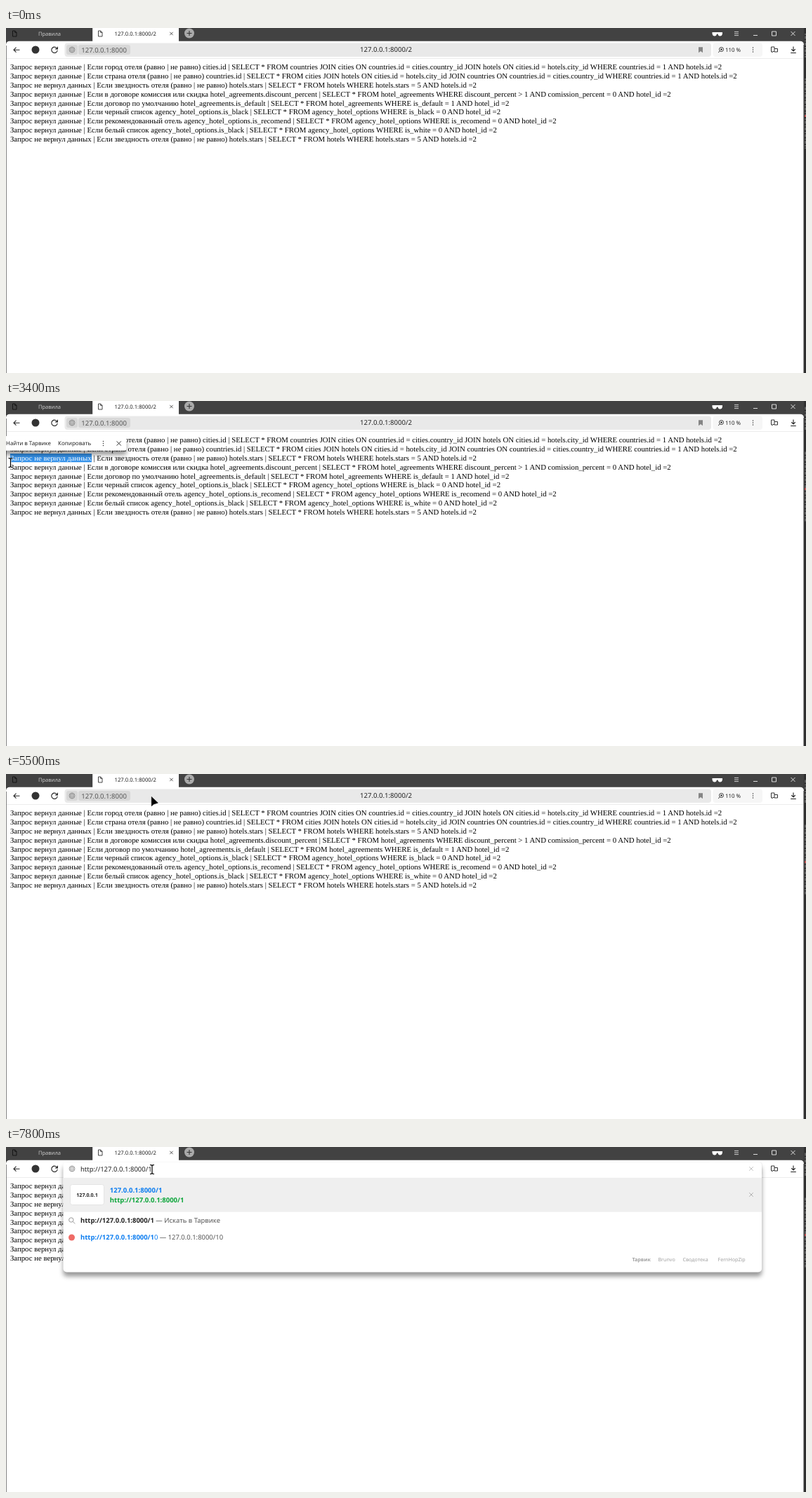
Write an HTML page that moves like this. It is 1139 px wide and 492 px high and loops after 8 s.

```html
<!DOCTYPE html>
<html lang="ru">
<head>
<meta charset="utf-8">
<style>
  html, body { margin: 0; width: 100%; height: 100%; overflow: hidden; background: #fff; }
  svg { display: block; width: 100%; height: 100%; }
  text { font-family: "Noto Sans", "Open Sans", sans-serif; text-rendering: geometricPrecision; }
  .page text { font: 10.77px "Liberation Serif", serif; }
  .medium { stroke-width: .03em; }
  .float { filter: drop-shadow(0 6px 3px rgba(0, 0, 0, .4)); }
</style>
</head>
<body>
<svg id="stage" viewBox="0 0 1139 492"></svg>
<script>
const QUERY = 'Запрос вернул данные | Если ';
const EMPTY = 'Запрос не вернул данных | Если звездность отеля (равно | не равно) hotels.stars | SELECT * FROM hotels WHERE hotels.stars = 5 AND hotels.id =2';
const LINES = [
  QUERY + 'город отеля (равно | не равно) cities.id | SELECT * FROM countries JOIN cities ON countries.id = cities.country_id JOIN hotels ON cities.id = hotels.city_id WHERE countries.id = 1 AND hotels.id =2',
  QUERY + 'страна отеля (равно | не равно) countries.id | SELECT * FROM cities JOIN hotels ON cities.id = hotels.city_id JOIN countries ON countries.id = cities.country_id WHERE countries.id = 1 AND hotels.id =2',
  EMPTY,
  QUERY + 'в договоре комиссия или скидка hotel_agreements.discount_percent | SELECT * FROM hotel_agreements WHERE discount_percent &gt; 1 AND comission_percent = 0 AND hotel_id =2',
  QUERY + 'договор по умолчанию hotel_agreements.is_default | SELECT * FROM hotel_agreements WHERE is_default = 1 AND hotel_id =2',
  QUERY + 'черный список agency_hotel_options.is_black | SELECT * FROM agency_hotel_options WHERE is_black = 0 AND hotel_id =2',
  QUERY + 'рекомендованный отель agency_hotel_options.is_recomend | SELECT * FROM agency_hotel_options WHERE is_recomend = 0 AND hotel_id =2',
  QUERY + 'белый список agency_hotel_options.is_black | SELECT * FROM agency_hotel_options WHERE is_white = 0 AND hotel_id =2',
  EMPTY,
];
const HOST = '127.0.0.1:8000', BLUE = '#3592ea';

// Drawing helpers; text is placed by its vertical centre.
const text = (x, y, str, size, fill = '#222', extra = '') =>
  `<text x="${x}" y="${y + size * .36}" font-size="${size}" fill="${fill}" stroke="${fill}" stroke-width="0" ${extra}>${str}</text>`;
const mid = (x, y, str, size, fill, extra = '') => text(x, y, str, size, fill, 'text-anchor="middle" ' + extra);
const rect = (x, y, w, h, fill, r = 0, extra = '') =>
  `<rect x="${x}" y="${y}" width="${w}" height="${h}" rx="${r}" fill="${fill}" ${extra}/>`;
const disc = (x, y, r, fill, extra = '') => `<circle cx="${x}" cy="${y}" r="${r}" fill="${fill}" ${extra}/>`;
const path = (x, y, d, color = '#333', w = 1) =>
  `<path transform="translate(${x} ${y})" d="${d}" fill="none" stroke="${color}" stroke-width="${w}"/>`;
const cross = (x, y, r, color, w) => path(x, y, `M${-r} ${-r}L${r} ${r}M${r} ${-r}L${-r} ${r}`, color, w);
const dots = (x, y) => [-3, 0, 3].map(d => disc(x, y + d, .75, '#333')).join('');
const bookmark = x => `<path d="M${x - 3} 27.2h6v8l-3-2.3l-3 2.3z" fill="#858585"/>`;
const bold = 'font-weight="700"', medium = 'class="medium"';

const file = (x, color) => path(x, 8, 'M-2.5-4H.7L3-1.6V4H-2.5zM.7-4V-1.6H3', color, .9);
const globe = () => disc(94, 31, 4, 'none', 'stroke="#777" stroke-width=".7"') +
  path(94, 31, 'M-3.7-1.2H3.7M-3.7 1.2H3.7M0-4Q-3.6 0 0 4Q3.6 0 0-4', '#777', .5);
const lens = (x, y, r, color) => disc(x, y, r, 'none', `stroke="${color}" stroke-width="1"`);

function pageText() {
  return '<g class="page">' + LINES.map((line, i) =>
    `<text x="5.9" y="${59 + i * 12.88}" fill="#000">${line}</text>`).join('') + '</g>';
}

function browserWindow() {
  return rect(0, 0, 1139, 492, '#fff') + rect(0, 0, 1139, 30, '#424242') +
    rect(0, 18.7, 1136, 40, '#fff', 5) + rect(0, 44, 1136, 448, '#fff') +
    rect(123.2, 0, 122.8, 24, '#fff') + rect(0, 43.2, 1136, .7, '#e4e4e4') +
    rect(0, 25, .9, 467, '#777') + rect(1135, 24, 1, 468, '#9a9a9a') +
    rect(1136, 0, 3, 492, '#303030') +
    '<path id="strip" d="M1138 8V42M1138 72V172" stroke="#777" stroke-width="1.4" stroke-dasharray="2 1.5 4 2"/>' +
    rect(1137, 124, 2, 3, '#b55') +
    file(12, '#111') + mid(62, 8, 'Правила', 7.5, '#c9c9c9') +
    file(134, '#333') + mid(184.3, 8, HOST + '/2', 7.7) + cross(235.5, 8, 2.2, '#444', .9) +
    disc(261, 7.5, 7, '#aaa') + path(261, 7.5, 'M-3.5 0H3.5M0-3.5V3.5', '#333', 1.1) +
    '<path d="M1005.5 6h14.5v2q-.5 3.5-3.5 3.5q-2.5 0-3-3h-1.5q-.5 3-3 3q-3 0-3.500-3.500z" fill="#fff"/>' +
    path(1040, 8, 'M-3-2.6H3M-3 0H3M-3 2.6H3', '#ddd', .9) +
    path(1067, 10.5, 'M-3 0H3', '#ddd') + path(1093.5, 8, 'M-3-3H3V3H-3z', '#ddd') +
    cross(1120.5, 8, 3, '#ddd') +
    path(15, 31.2, 'M4.5 0H-4M-.5-3.5L-4 0L-.5 3.5', '#222', 1.1) +
    disc(42, 31, 5.5, '#333') +
    path(69, 31.2, 'M3.9-1.5A4.2 4.2 0 1 0 4.2.5M4.4-4.5V-1.3H1.2', '#222', 1.1) +
    rect(83.5, 21.5, 920.5, 19.5, '#e9e9e9', 4) + rect(86, 24, 16, 14, '#d7d7d7', 3) + globe() +
    rect(103, 24, 74, 14, '#d7d7d7', 3) + text(107.3, 31.2, HOST, 9.5, '#555') +
    mid(541, 31, HOST + '/2', 9.55) + bookmark(989) +
    rect(1006.5, 21.5, 70.5, 19.5, '#f6f6f6', 4) + lens(1018.5, 30.5, 3, '#333') +
    path(1018.5, 30.5, 'M-1.5 0H1.5M0-1.5V1.5M-2 2.2L-4.5 4.5', '#333', .9) +
    text(1024, 31.2, '110 %', 7.8) + dots(1063.5, 31) +
    path(1094, 31, 'M-4.5-4H0V2.5H-2L-3.5 4V2.5H-4.5zM0-1.5H4.5V3H0', '#333') +
    path(1121, 31, 'M0-4.5V2M-2.8-.8L0 2L2.8-.8M-3.8 4.5H3.8', '#222', 1.1);
}

function pageSelection() {
  return '<clipPath id="selClip"><rect id="selRect" y="74.9" height="12.4"/></clipPath>' +
    `<g id="selection" class="page" clip-path="url(#selClip)">${rect(0, 70, 130, 20, BLUE)}` +
    `<text x="5.9" y="84.76" fill="#fff">${EMPTY}</text></g>`;
}

function popup() {
  return '<g id="popup">' + rect(-9, 50, 180.5, 20.7, '#fff', 3, 'class="float"') +
    text(64, 60.5, 'Найти в Тарвике', 7.9, '#222', 'text-anchor="end"') +
    text(74, 60.5, 'Копировать', 8) + dots(138.5, 60.5) + cross(160.7, 60.5, 3.1, '#333', 1) + '</g>';
}

const panel = height => rect(81.5, 21.5, 994.5, height, '#fff', 5, 'class="float"');
const tileX = col => 264.5 + col * 105.45, tileY = row => 55.5 + row * 65.5;
const tile = (col, row, fill, content = '') =>
  `<g transform="translate(${tileX(col)} ${tileY(row)})">` +
  (fill === '#fff' ? rect(0, 0, 101, 60, fill, 4, 'stroke="#ddd" stroke-width=".8"')
    : rect(-.4, -.4, 101.5, 60.8, fill, 4)) + content + '</g>';

// Four small cards inside a tile: [fill, text colour, lines, size]
function cards(list) {
  return list.map(([fill, color, lines, size = 4.1], i) => {
    const body = lines.map((line, k) =>
      mid(21.5, 11.5 + (k - (lines.length - 1) / 2) * 5, line, size, color, size > 5 ? bold : medium)).join('');
    return `<g transform="translate(${6.5 + i % 2 * 45.5} ${5 + (i >> 1) * 26})">` +
      rect(0, 0, 43, 23, fill, 2, fill === '#fff' ? 'stroke="#eee" stroke-width=".6"' : '') + body + '</g>';
  }).join('');
}

function shortcuts() {
  const button = (x, w, label) => rect(x, 24, w, 14, '#e4e4e4', 3) + mid(x + w / 2, 31, label, 7);
  const white = (...lines) => ['#fff', '#222', lines];
  const blank = white();
  return '<g id="shortcuts">' + panel(171.5) + rect(86, 24, 16, 14, '#dedede', 3) + globe() +
    text(107, 31.2, `http://${HOST}/2`, 9.53) +
    '<clipPath id="urlClip"><rect id="urlRect" y="25" height="12.5"/></clipPath><g clip-path="url(#urlClip)">' +
    rect(100, 24, 112, 15, '#3390ff') + text(107, 31.2, `http://${HOST}/2`, 9.53, '#fff') + '</g>' +
    '<path id="caret" d="M209.6 25.5V37" stroke="#222" stroke-width=".7"/>' +
    button(934.5, 56, 'Копировать') + button(995, 51.5, 'Поделиться') + bookmark(1061) +
    tile(0, 0, '#fff', mid(51, 30, '127.0.0.1', 11.3, '#111', medium)) +
    tile(1, 0, '#fff', disc(50.5, 30, 13, '#4285f4')) +
    tile(2, 0, '#fff', disc(50.5, 30, 13, '#d6312f')) +
    tile(3, 0, '#fff', disc(50.5, 25, 12, '#fc3f1d') + mid(50.5, 49, '→ Пелт', 7.6, '#111', medium)) +
    tile(4, 0, '#140f14', mid(50.5, 23, 'Your', 11.2, '#fff', medium) + mid(50.5, 37, 'Repositories', 11.2, '#fff', medium)) +
    tile(5, 0, '#fff', cards([blank, blank, blank, blank]) + disc(28, 17, 5, '#fc3f1d') +
      disc(73.5, 17, 5.5, '#f5a800') + rect(22, 38, 12, 10, '#ff9a3c', 2) + rect(68, 38, 11, 10, '#1268d8', 2)) +
    tile(0, 1, '#fff', cards([white('Laravel'), ['#7d7eb5', '#fff', ['Laravel']],
      white('Backend Workshop -', 'Vidorna'), white('Просто о', 'Laravel. DevMoth', '- Vidorna')])) +
    tile(1, 1, '#ff8509', disc(50.5, 23.5, 10, '#fff') + mid(50.5, 48.5, 'Телевизоры купить...', 7.7, '#fff')) +
    tile(2, 1, '#fff', cards([['#0d6efd', '#fff', ['Telvorian']], ['#414850', '#fff', ['Nebfix']],
      white('Backend Notes -', 'Vidorna'), ['#629fbc', '#fff', ['Вурт'], 7.6]])) +
    tile(3, 1, '#fff', disc(50.5, 30, 15, '#fc3f1d')) +
    tile(4, 1, '#fff', cards([white('VLX 2170 +', 'Torven 8 1200 :', 'Test in 14 Gam...'),
      white('borvex vlx 2170 vs', '1180 - Vidorna'), white('1150 vs 2170 -', 'Vidorna')])) +
    tile(5, 1, '#e3e3e3') + '</g>';
}

function suggestions() {
  const url = `http://${HOST}/1`;
  const engine = (x, name, extra) => text(x, 160, name, 7.1, '#a0a0a0', extra);
  return '<g id="suggestions">' + panel(157) + rect(81.5, 43.8, 994.5, 48.8, '#efefef') + globe() +
    text(106, 31.2, url, 9.5) + cross(1061, 31, 2.8, '#bbb', .9) + cross(1061, 68, 2.8, '#aaa', .9) +
    rect(91.5, 53.5, 48, 29, '#fff', 3, 'stroke="#ddd" stroke-width=".7"') +
    mid(115.5, 68, '127.0.0.1', 7.1, '#222', bold) +
    text(147.8, 61.5, HOST + '/1', 9.5, '#0a7cf0', bold) + text(147.8, 76, url, 9.5, '#0ba53a', bold) +
    lens(92.8, 104, 3.2, '#999') + path(95.2, 106.4, 'M0 0L3 3', '#999', 1) +
    text(106, 105, `<tspan ${bold}>${url}</tspan><tspan fill="#555"> — Искать в Тарвике</tspan>`, 9.45) +
    disc(93.5, 129, 4.5, '#ef6b66') +
    text(106, 129, `<tspan ${bold}>${url}</tspan>0<tspan fill="#555"> — ${HOST}/10</tspan>`, 9.45, '#0a7cf0') +
    engine(891.5, 'Тарвик', bold) + engine(928.5, 'Brunvo') + engine(963.5, 'Сводотека') +
    engine(1013.5, 'FernHopZip') + '</g>';
}

function cursors() {
  const beam = 'M-3-6.5Q0-6.5 0-5V5Q0 6.5-3 6.5M3-6.5Q0-6.5 0-5M0 5Q0 6.5 3 6.5';
  return '<path id="arrow" d="M0 0V13.4L3.3 10.6L9.2 8.8z" fill="#000" stroke="#000" stroke-width=".5" stroke-linejoin="round"/>' +
    '<g id="beam">' + path(0, 0, beam, '#fff', 2) + path(0, 0, beam, '#000', 1.2) + '</g>';
}

const stage = document.getElementById('stage');
stage.innerHTML = browserWindow() + pageText() + pageSelection() + popup() + shortcuts() + suggestions() + cursors();
const el = id => document.getElementById(id);
const show = (id, on) => el(id).setAttribute('visibility', on ? 'visible' : 'hidden');

// Pointer path: time, x, y
const POINTER = [
  [100, 86, -18], [1000, 123.5, 83], [1100, 123.5, 83], [1400, 122, 82.5], [2000, 122, 82.5],
  [2500, 34, 79], [2800, 34, 79], [3000, 6.5, 88], [3600, 6.5, 88], [4000, 204.7, 79],
  [4100, 204.7, 79], [4200, 204.7, 78], [4300, 204.7, 78], [4500, 207.5, 80], [4900, 207.5, 80],
  [5500, 207.2, 32.4], [6700, 207.2, 32.4], [6800, 207.6, 32], [6900, 207.6, 32],
  [7000, 207.2, 32.4], [7700, 207.2, 32.4], [7800, 208, 32], [8000, 208, 32],
];

function pointerAt(t) {
  const i = POINTER.findIndex(key => key[0] >= t);
  const [t1, x1, y1] = POINTER[i], [t0, x0, y0] = POINTER[Math.max(0, i - 1)];
  const k = t1 > t0 ? (t - t0) / (t1 - t0) : 1;
  return [x0 + (x1 - x0) * k, y0 + (y1 - y0) * k];
}

function setSpan(id, from, to) {
  el(id).setAttribute('x', from);
  el(id).setAttribute('width', Math.max(0, to - from));
}

function draw(now) {
  const t = Math.floor(now % 8000 / 100) * 100;
  const [x, y] = pointerAt(t);
  const beam = y > 46 || t >= 7800;
  show('arrow', !beam && t >= 200);
  show('beam', beam);
  for (const id of ['arrow', 'beam']) el(id).setAttribute('transform', `translate(${x} ${y})`);

  show('selection', t >= 2100 && t < 4700);
  setSpan('selRect', t >= 3000 ? 5.9 : Math.max(5.9, x + 3.6), 122);
  show('popup', t >= 3400 && t < 4700);

  show('shortcuts', t >= 6000 && t < 7800);
  setSpan('urlRect', t < 6600 ? 107 : 204, t >= 6600 && t < 6800 ? 204 : 209.6);
  show('caret', t >= 6600 && t < 6800);
  show('suggestions', t >= 7800);
  el('strip').setAttribute('stroke-dashoffset', t < 1800 ? 0 : 3);
}

function loop() {
  draw(performance.now());
  requestAnimationFrame(loop);
}
loop();
</script>
</body>
</html>
```
